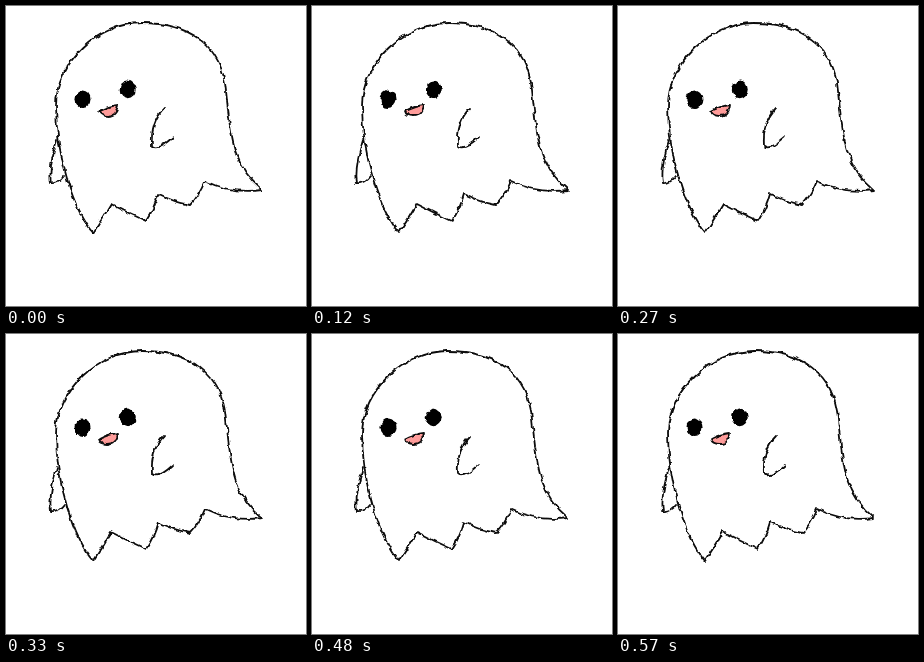
Write an HTML page that moves like this. It is 300 by 300 pixels and loops after 0.6 s.

```html
<!DOCTYPE html>
<html lang="en">
<head>
<meta charset="utf-8">
<title>Ghost</title>
<style>
html, body { margin: 0; width: 100%; height: 100%; overflow: hidden; background: #fff; }
svg { display: block; width: 300px; height: 300px; }
.ink { fill: none; stroke: #0c0c0c; stroke-width: 1.8; stroke-linejoin: round; stroke-linecap: round; }
.mouth { fill: #ff9c9a; }
</style>
</head>
<body>
<svg viewBox="0 0 300 300">
  <!-- Noise pushes the drawn lines about; a new seed redraws the wobble. -->
  <filter id="boil" filterUnits="userSpaceOnUse" x="0" y="0" width="300" height="300"
          color-interpolation-filters="sRGB">
    <feTurbulence id="noise" type="fractalNoise" baseFrequency="0.13" numOctaves="2" result="noise"/>
    <feDisplacementMap in="SourceGraphic" in2="noise" scale="5"
                       xChannelSelector="R" yChannelSelector="G"/>
  </filter>
  <g filter="url(#boil)">
    <g class="ink">
      <path d="M87,227 C68,205 50,150 50,100 C50,56 92,17 136,17
               C182,17 216,38 220,85 C225,130 225,158 256,184
               Q225,188 199,175 Q193,190 184,199 Q168,196 152,188
               Q148,203 140,215 Q122,207 105,198 Q97,212 87,227 Z"/>
      <path d="M51,134 C46,150 43,165 45,177 Q52,178 58,170"/>
      <path d="M158,102 C148,112 145,126 146,140 Q152,145 167,131"/>
      <path class="mouth" d="M93,105 Q103,100 112,99 Q111,110 102,110 Q94,110 93,105 Z"/>
    </g>
    <ellipse cx="76.5" cy="93.2" rx="8" ry="8.8"/>
    <ellipse cx="121.7" cy="83.4" rx="8" ry="8.8"/>
  </g>
</svg>
<script>
const STEP = 30, POSES = 20;
const noise = document.getElementById('noise');

function tick() {
  const pose = Math.floor(performance.now() / STEP) % POSES;
  noise.setAttribute('seed', pose + 1);
  requestAnimationFrame(tick);
}
tick();
</script>
</body>
</html>
```
